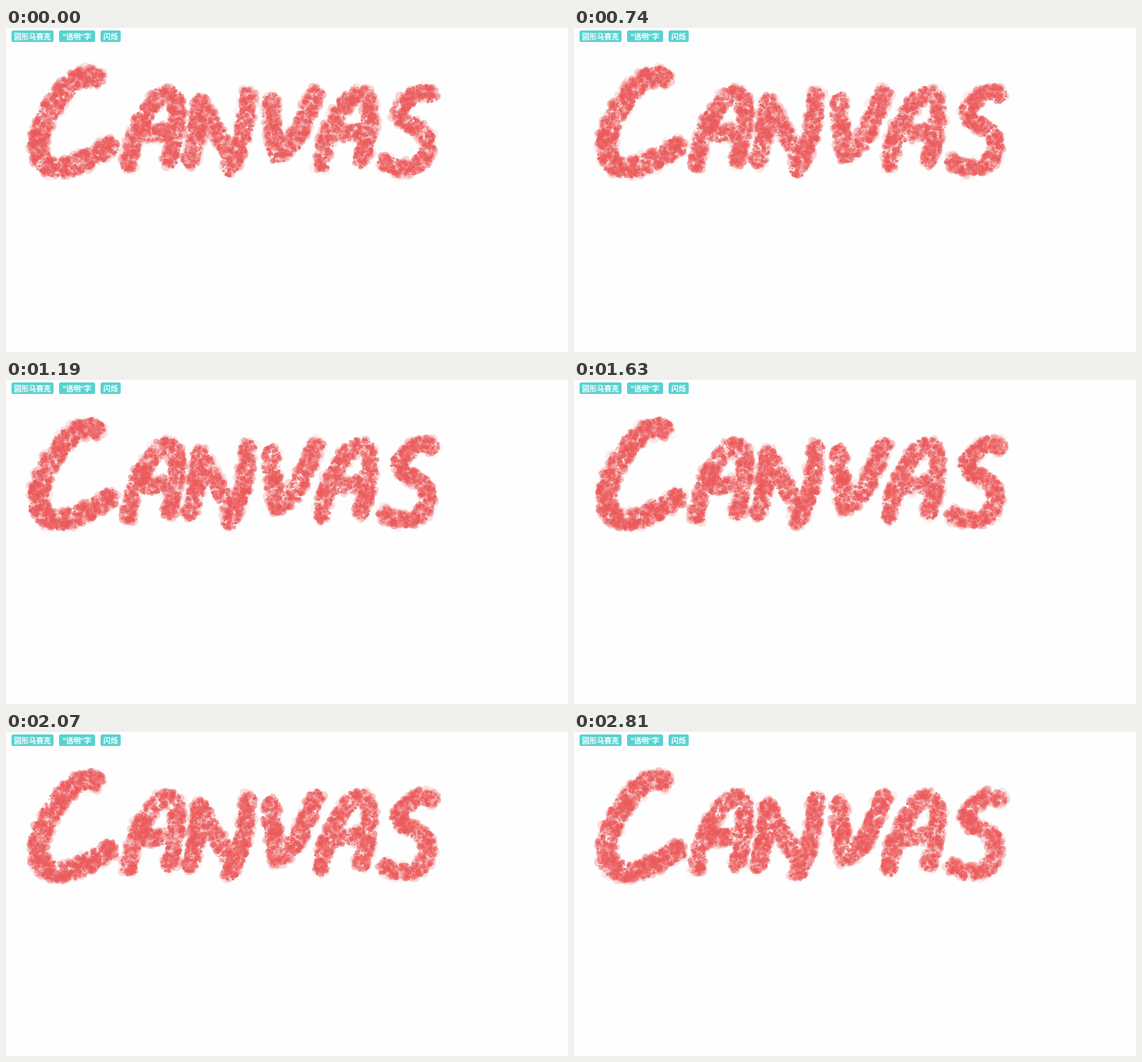
Animation, 921 px wide and 532 px high, one loop 2910 ms. Source, as an HTML page with a canvas:

```html
<!DOCTYPE html>
<html lang="zh-CN">
<head>
<meta charset="utf-8">
<style>
html, body { margin: 0; width: 100%; height: 100%; overflow: hidden; background: #fefefe; }
canvas { position: absolute; left: 0; top: 0; }
nav { position: absolute; left: 9px; top: 4px; display: flex; gap: 9px; }
span {
  height: 19px; padding: 0 4.5px; border-radius: 3px;
  background: #5ad2d0; color: #fff; white-space: nowrap;
  font: bold 12px/21px "Noto Sans", "Noto Sans CJK SC", "Noto Sans CJK", sans-serif;
}
q { display: inline-block; min-width: 50px; text-align: center; quotes: none; }
</style>
</head>
<body>
<canvas width="921" height="532"></canvas>
<nav><span>圆形马赛克</span><span><q>“透明”字</q></span><span>闪烁</span></nav>
<script>
const LOOP = 2910, STEP = 147.5, DENSITY = 0.21, GROWTH = 0.37;

const canvas = document.querySelector('canvas');
const ctx = canvas.getContext('2d');
const { width, height } = canvas;

const random = n => {
  const v = Math.sin(n * 12.9898) * 43758.5453;
  return v - Math.floor(v);
};

// Paints the lettering with a round brush and returns every covered pixel
function lettering() {
  const mask = new OffscreenCanvas(width, height).getContext('2d');
  mask.lineCap = mask.lineJoin = 'round';
  const brush = (size, path, dx = 0) => {
    mask.setTransform(1, 0, 0, 1, dx, 0);
    mask.lineWidth = size;
    mask.stroke(new Path2D(path));
  };
  const A = 'M202 223Q206 175 232 138Q248 112 263 108Q282 108 281 145Q280 180 267 217M215 175L275 171';
  brush(32, 'M146 81C122 74 98 96 80 124C62 153 51 178 54 204C58 232 90 234 112 226Q142 214 169 195');
  brush(27, A);
  brush(28, 'M303 217Q316 170 318 122Q340 167 366 206M397 113Q396 172 367 231');
  brush(29, 'M435 121Q436 170 446 207L470 189Q488 160 507 109');
  brush(27, A, 316);
  brush(26, 'M697 110Q680 101 660 118Q630 140 657 156Q695 168 691 195Q685 231 655 230Q635 230 622 221');

  const { data } = mask.getImageData(0, 0, width, height);
  const points = [];
  for (let i = 0; i < width * height; i++)
    if (data[i * 4 + 3] > 127) points.push([i % width, Math.floor(i / width)]);
  return points;
}

const points = lettering();
const count = Math.floor(points.length * DENSITY);

function draw(tick) {
  ctx.clearRect(0, 0, width, height);
  ctx.fillStyle = '#eb5a5b';
  for (let i = 1; i <= count; i++) {
    // Each dot swells and fades, then starts again somewhere else
    const limit = 2 + 9 * random(i) ** 2;
    const grown = random(i + 0.3) * limit + GROWTH * tick;
    const life = Math.floor(grown / limit);
    const radius = grown % limit;
    const [x, y] = points[Math.floor(random(i + 0.6 + life * 7919) * points.length)];
    ctx.globalAlpha = 1 - radius / limit;
    ctx.beginPath();
    ctx.arc(x, y, radius, 0, 7);
    ctx.fill();
  }
}

let shown = -1;
function frame() {
  const tick = Math.floor(performance.now() % LOOP / STEP);
  if (tick !== shown) draw(shown = tick);
  requestAnimationFrame(frame);
}
frame();
</script>
</body>
</html>
```
